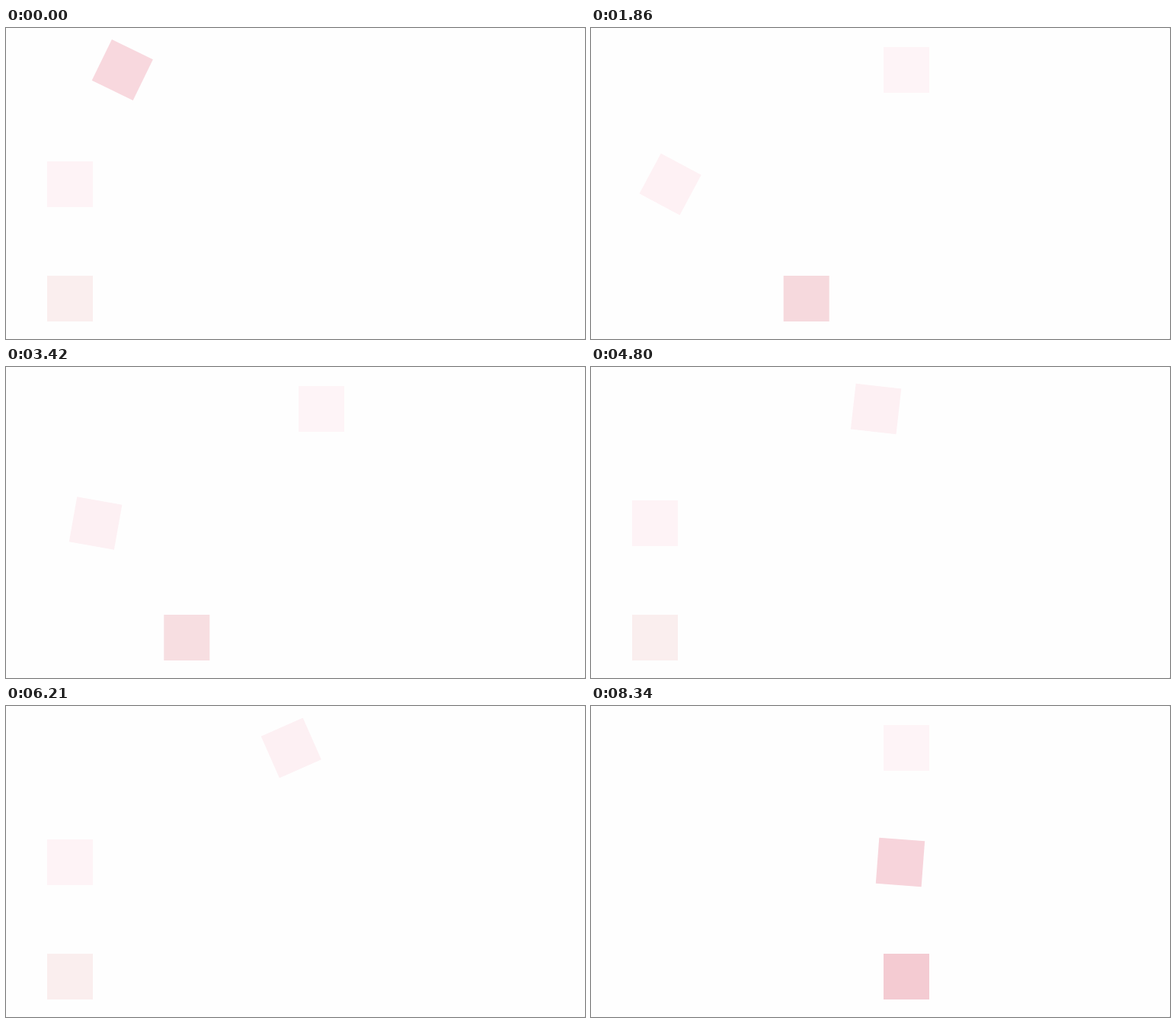
Animation of 760 by 408 pixels, one loop 8370 ms. Source, as an HTML page with a canvas:

```html
<!DOCTYPE html>
<html lang="en">
<head>
<meta charset="utf-8">
<title>Sliding squares</title>
<style>
  html, body { margin: 0; width: 100%; height: 100%; overflow: hidden; background: #fefefe; }
  canvas { display: block; }
</style>
</head>
<body>
<canvas id="stage" width="760" height="408"></canvas>
<script>
const ctx = document.getElementById('stage').getContext('2d');
const LOOP = 8370, STEP = 30, SIZE = 60, LEFT = 84, TRAVEL = 330, TURN = 720;

// Stretches of the loop where the picture stands still.
const holds = [[420, 1410], [3840, 4800], [5430, 5580], [6210, 7200]];

// CSS "ease": cubic-bezier(.25, .1, .25, 1)
function ease(u) {
  const bezier = (s, a, b) => 3 * (1 - s) ** 2 * s * a + 3 * (1 - s) * s * s * b + s ** 3;
  let low = 0, high = 1;
  for (let i = 0; i < 24; i++) {
    const mid = (low + high) / 2;
    if (bezier(mid, .25, .25) < u) low = mid; else high = mid;
  }
  return bezier(low, .1, 1);
}

// Smooth curve through a few points, flat at both ends.
function through(points) {
  const slope = i => {
    const before = points[i - 1], after = points[i + 1];
    return before && after ? (after[1] - before[1]) / (after[0] - before[0]) : 0;
  };
  return u => {
    let i = 0;
    while (i < points.length - 2 && u > points[i + 1][0]) i++;
    const [x0, y0] = points[i], [x1, y1] = points[i + 1];
    const w = x1 - x0, s = (u - x0) / w;
    return y0 * (1 + 2 * s) * (1 - s) ** 2 + slope(i) * w * s * (1 - s) ** 2
      + y1 * s * s * (3 - 2 * s) + slope(i + 1) * w * s * s * (s - 1);
  };
}

const glide = through([[0, 0], [.164, .061], [.31, .16], [.53, .57], [.66, .78], [.883, .977], [1, 1]]);
const glideBack = through([[0, 0], [.046, .035], [.35, .35], [.6, .78], [1, 1]]);

const leg = (start, dir, curve, duration = 1000) => ({ start, dir, curve, duration });

const squares = [
  { y: 55, spins: true, from: [246, 209, 216], to: [254, 244, 247],
    legs: [leg(-161, 1, ease), leg(4684, -1, ease), leg(5580, 1, ease, 0), leg(5618, 1, ease)] },
  { y: 205, spins: true, from: [254, 243, 246], to: [247, 211, 218],
    legs: [leg(1696, 1, glide), leg(2684, -1, glideBack), leg(7459, 1, glide)] },
  { y: 355, spins: false, from: [250, 238, 238], to: [244, 203, 210],
    legs: [leg(1312, 1, glide), leg(2960, -1, glide, 900), leg(7113, 1, glide)] }
];
squares[0].legs[2].rest = true;

function pose(square, t) {
  const current = square.legs.filter(l => l.start <= t).pop();
  if (!current || current.rest) return { shift: 0, angle: 0 };
  const u = Math.min(1, (t - current.start) / current.duration);
  const p = current.curve(u);
  return current.dir > 0
    ? { shift: p, angle: TURN * u }
    : { shift: 1 - p, angle: TURN * (1 - u) };
}

function draw(t) {
  ctx.fillStyle = '#fefefe';
  ctx.fillRect(0, 0, 760, 408);
  ctx.fillStyle = '#e6e6e6';
  ctx.fillRect(759, 0, 1, 1);
  ctx.fillRect(759, 407, 1, 1);
  for (const square of squares) {
    const { shift, angle } = pose(square, t);
    const color = square.from.map((c, i) => Math.round(c + (square.to[i] - c) * shift));
    ctx.save();
    ctx.translate(LEFT + TRAVEL * shift, square.y);
    if (square.spins) ctx.rotate(angle * Math.PI / 180);
    ctx.fillStyle = `rgb(${color})`;
    ctx.fillRect(-SIZE / 2, -SIZE / 2, SIZE, SIZE);
    ctx.restore();
  }
}

const origin = performance.now();
function tick() {
  const elapsed = (performance.now() - origin) % LOOP;
  const t = Math.floor(elapsed / STEP) * STEP;
  const hold = holds.find(([start, end]) => t >= start && t < end);
  draw(hold ? hold[0] : t);
  requestAnimationFrame(tick);
}
tick();
</script>
</body>
</html>
```
